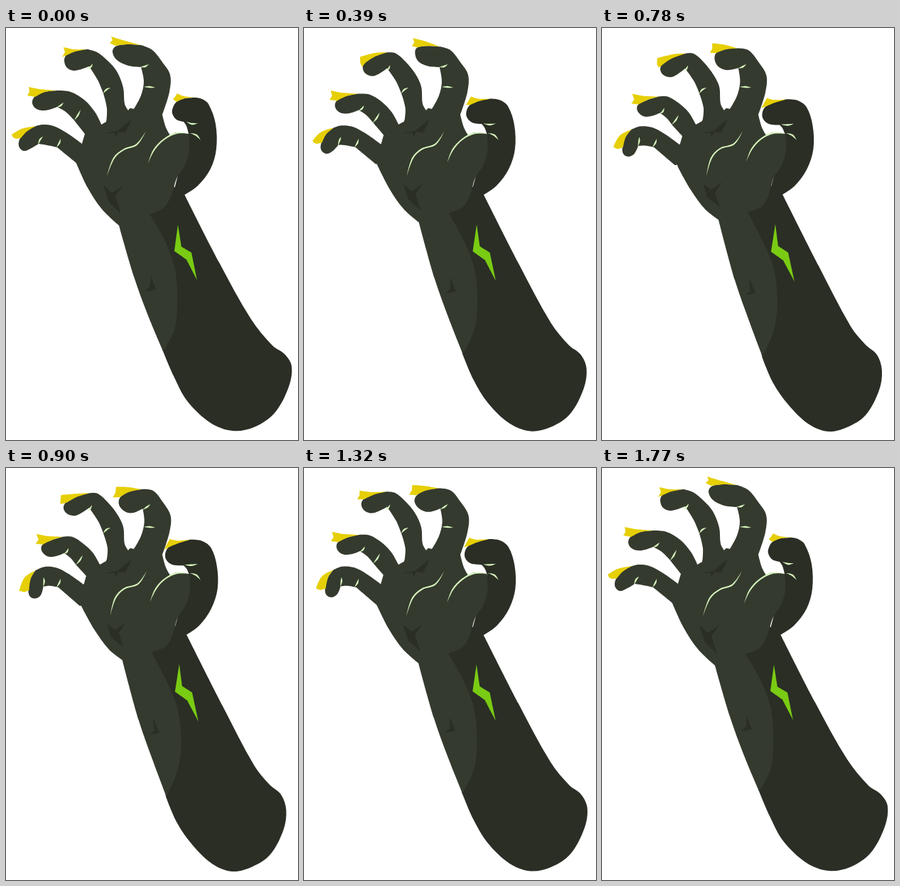
Write an HTML page with a canvas that moves like this. It is 411 by 580 pixels and loops after 1.8 s.

```html
<!DOCTYPE html>
<html lang="en">
<head>
<meta charset="utf-8">
<title>Zombie hand</title>
<style>
html, body { margin: 0; width: 100%; height: 100%; overflow: hidden; background: #fff; }
canvas { display: block; width: 411px; height: 580px; }
</style>
</head>
<body>
<canvas id="stage"></canvas>
<script>
const W = 411, H = 580, LOOP = 1800, STEP = 30;
const LIGHT = '#343a2e', DARK = '#2a2e25', NAIL = '#e6cf05', GREEN = '#7acb13', PALE = '#d8f5bd';
const TIMES = [0, 270, 540, 780, 1050, 1530, LOOP];

const canvas = document.getElementById('stage');
const ctx = canvas.getContext('2d');
const dpr = window.devicePixelRatio || 1;
canvas.width = W * dpr;
canvas.height = H * dpr;
ctx.scale(dpr, dpr);

// "x,y" is a smooth point, "x,y!" a corner
function parse(text) {
  return text.trim().split(/\s+/).map(word => {
    const [x, y] = word.replace('!', '').split(',').map(Number);
    return { x, y, corner: word.endsWith('!') };
  });
}
const poses = (...texts) => texts.map(parse);

// The first pose plus weighted offsets towards the others
function blend(list, weights) {
  return list[0].map((p, i) => {
    let { x, y } = p;
    for (let k = 1; k < list.length; k++) {
      x += weights[k - 1] * (list[k][i].x - p.x);
      y += weights[k - 1] * (list[k][i].y - p.y);
    }
    return { x, y, corner: p.corner };
  });
}

// Monotone cubic interpolation over TIMES
function sample(values, t) {
  const last = TIMES.length - 1;
  let i = 0;
  while (i < last - 1 && t >= TIMES[i + 1]) i++;
  const rise = k => (values[k + 1] - values[k]) / (TIMES[k + 1] - TIMES[k]);
  const slope = k => {
    if (k === 0 || k === last) return 0;
    const a = rise(k - 1), b = rise(k);
    return a * b <= 0 ? 0 : 2 * a * b / (a + b);
  };
  const d = TIMES[i + 1] - TIMES[i], s = (t - TIMES[i]) / d, r = 1 - s;
  return values[i] * r * r * (1 + 2 * s) + values[i + 1] * s * s * (3 - 2 * s)
    + d * s * r * (slope(i) * r - slope(i + 1) * s);
}

function fill(pts, color) {
  const n = pts.length;
  const at = i => pts[(i + n) % n];
  const handle = (i, length) => {
    const p = at(i);
    if (p.corner) return p;
    const a = at(i - 1), b = at(i + 1);
    const k = length / 3 / (Math.hypot(b.x - a.x, b.y - a.y) || 1);
    return { x: p.x + (b.x - a.x) * k, y: p.y + (b.y - a.y) * k };
  };
  ctx.beginPath();
  ctx.moveTo(pts[0].x, pts[0].y);
  for (let i = 0; i < n; i++) {
    const p = at(i), q = at(i + 1);
    const len = Math.hypot(q.x - p.x, q.y - p.y);
    const c = handle(i, len), d = handle(i + 1, -len);
    ctx.bezierCurveTo(c.x, c.y, d.x, d.y, q.x, q.y);
  }
  ctx.closePath();
  ctx.fillStyle = color;
  ctx.fill();
}

// A line that tapers to a point at both ends
function crease(pts, half) {
  const end = pts.length - 1;
  const side = sign => pts.map((p, i) => {
    if (i === 0 || i === end) return { x: p.x, y: p.y, corner: true };
    const a = pts[i - 1], b = pts[i + 1];
    const k = sign * half / Math.hypot(b.x - a.x, b.y - a.y);
    return { x: p.x - (b.y - a.y) * k, y: p.y + (b.x - a.x) * k };
  });
  fill(side(1).concat(side(-1).slice(1, -1).reverse()), PALE);
}

const armTrack = [[0, .27, .87, 1, .82, .13, 0]];

const arm = poses(
  `225,215! 251,234! 300,330 345,410 375,447 392,459 402,476 398,505 378,542 349,562
   319,567 288,556 255,525 236,490 221,455! 210,400! 200,262!`,
  `225,215! 254,234! 305,335 350,420 371,446 387,460 394,482 390,510 371,545 345,562
   318,568 290,557 262,530 241,500 226,465! 212,400! 204,259!`);

const palm = poses(
  `221,455! 237,425 241,385 238,340 224,300 202,262! 222,253 233,235 240,212 252,193
   258,172 257,149! 240,147 231,151! 225,140 220,122! 205,100! 180,114! 175,113 172,116!
   150,110! 141,132! 134,136! 120,125! 111,149! 107,163! 95,165! 98,188! 115,225 135,255
   159,278! 180,350 200,405`,
  `226,463! 242,425 247,385 242,340 230,308 205,259! 225,251 235,234 241,212 253,193
   259,172 258,149! 241,147 231,151! 225,140 220,122! 205,100! 180,114! 175,113 172,116!
   150,110! 141,131! 132,136! 124,128! 113,152! 110,163! 100,170! 107,196! 125,228 145,255
   164,270! 187,355 208,415`);

const scars = [
  poses('140,148! 157,145! 177,128! 168,147! 158,146! 154,154! 153,148!'),
  poses('137,221! 149,232! 165,222! 154,236! 162,262! 145,245!',
    '143,220! 154,228! 169,217! 159,232! 166,252! 148,238!'),
  poses('204,349! 211,368! 196,371! 203,363!', '207,352! 216,373! 202,376! 209,370!')
];

const bolt = poses('242,277! 247,308! 261,316! 269,355! 254,326! 237,314!',
  '244,276! 248,307! 262,316! 271,357! 255,327! 238,315!');

const palmLines = [
  poses('197,145 184,164 166,171 152,183 142,209', '198,145 186,163 166,170 154,183 147,208'),
  poses('258,149 240,148 222,157 208,172 200,191', '258,149 241,148 224,156 211,170 203,188')
];

const thumb = {
  color: DARK,
  tracks: [[0, .35, .65, .75, 1, .35, 0]],
  body: poses(
    `268,98! 252,99 240,104 235,112 234,120 240,129 250,132! 254,138 257,149! 235,235!
     251,235! 270,222 288,198 296,170 295,135 285,107 276,100`,
    `258,101! 241,106 228,112 223,120 224,130 233,137 250,138! 254,142 258,150! 235,235!
     254,235! 272,222 289,198 298,170 297,138 289,113 276,103`),
  nail: poses('241,92! 250,96 268,98! 252,99 240,104! 235,100! 238,97!',
    '229,101! 240,103 258,101! 241,107 229,112! 221,117! 224,110!'),
  lines: [
    poses('270,134 262,135 254,132', '270,135 261,137 251,137'),
    poses('259,148 268,151 274,158')
  ]
};

const fingers = [
  { // little
    tracks: [[0, .22, .42, .62, 1, .33, 0]],
    body: poses(
      `42,138! 29,145 20,155 18,166 25,173 36,169 46,163! 58,165 72,168! 99,190! 125,190!
       107,163! 86,148 67,138 52,136`,
      `41,146! 36,158 34,177 38,185 46,186 52,181 54,168! 62,166 74,168! 105,195! 125,190!
       108,163! 88,149 72,141 54,140`),
    nail: poses('8,150! 22,142 42,138! 29,146 21,155! 14,156! 10,154!',
      '21,178! 27,157 41,146! 36,158 35,176! 28,179! 23,178!'),
    lines: [
      poses('52,153 48,157 45,165', '53,154 55,160 54,168'),
      poses('77,156 75,162 71,168')
    ]
  },
  { // ring
    tracks: [[0, .3, .75, .95, 1, .3, 0]],
    body: poses(
      `74,88! 54,90 40,97 37,106 43,114 56,116 72,111! 84,118 96,130! 111,149! 130,155!
       134,135! 125,118 110,101 91,90`,
      `80,97! 64,102 51,109 51,118 60,125 72,124 82,120! 91,127 99,137! 113,152! 130,155!
       132,136! 122,119 108,106 93,97`),
    nail: poses('32,83! 47,86 74,88! 55,90 41,97! 30,95! 33,90!',
      '43,93! 58,96 80,97! 64,102 52,108! 42,107! 46,101!'),
    lines: [
      poses('81,105 77,109 71,112', '88,113 86,118 81,122'),
      poses('105,115 101,123 96,130', '108,123 104,130 98,137')
    ]
  },
  { // middle
    tracks: [[0, .4, 1, .7, 0, 0, 0], [0, 0, 0, .3, 1, .3, 0]],
    body: poses(
      `115,30! 98,32 85,38 82,46 86,56 97,60 117,54! 129,73 137,92! 142,113 141,134!
       165,140! 172,116! 167,107 165,84 156,61 143,46 128,34`,
      `118,36! 99,43 86,52 83,61 89,69 101,70 117,58! 130,76 137,92! 143,113 141,134!
       165,140! 172,116! 167,107 165,82 157,66 143,48 129,36`,
      `118,35! 98,39 83,47 80,55 86,63 98,65 117,55! 130,75 137,92! 143,113 141,134!
       165,140! 172,116! 167,107 165,83 156,64 143,48 129,36`),
    nail: poses('81,27! 95,30 115,30! 98,33 86,38! 79,41! 83,34!',
      '78,46! 103,37 118,36! 99,44 88,52! 83,60! 78,56!',
      '77,34! 97,36 118,35! 98,40 84,47! 73,46! 76,40!'),
    lines: [
      poses('122,50 119,55 113,58', '121,53 119,58 116,61', '121,52 118,57 114,60'),
      poses('147,84 141,87 137,92')
    ]
  },
  { // index
    tracks: [[0, .45, 1, .6, 0, 0, 0], [0, 0, 0, .4, 1, .25, 0]],
    body: poses(
      `190,24! 170,23 154,26 150,34 156,45 172,53 190,55! 194,75 190,95 180,114! 200,130!
       220,122! 230,90 231,66 220,48 206,31`,
      `192,27! 174,26 160,29 159,40 164,49 176,54 191,55! 194,75 190,95 180,114! 200,130!
       220,122! 230,90 231,66 220,48 206,31`,
      `190,31! 173,36 161,46 159,56 167,65 178,67 193,58! 195,76 190,96 180,114! 200,130!
       220,122! 230,91 232,68 221,48 207,32`),
    nail: poses('148,12! 164,17 190,24! 170,23 154,25! 146,21! 150,17!',
      '155,15! 172,19 192,27! 174,26 161,28! 154,27! 157,21!',
      '155,31! 172,30 190,31! 172,37 160,46! 149,47! 153,40!'),
    lines: [
      poses('201,51 196,54 189,55', '203,51 198,54 191,55', '203,51 199,55 193,60'),
      poses('210,84 202,83 194,83')
    ]
  }
];

const weigh = (tracks, t) => tracks.map(v => sample(v, t));

function drawFinger(finger, t) {
  const w = weigh(finger.tracks, t);
  fill(blend(finger.body, w), finger.color || LIGHT);
  fill(blend(finger.nail, w), NAIL);
}

function drawLines(finger, t) {
  const w = weigh(finger.tracks, t);
  finger.lines.forEach(line => crease(blend(line, w), 1.2));
}

function draw(t) {
  const w = weigh(armTrack, t);
  ctx.fillStyle = '#fff';
  ctx.fillRect(0, 0, W, H);
  fill(blend(arm, w), DARK);
  drawFinger(thumb, t);
  fill(blend(palm, w), LIGHT);
  fingers.forEach(f => drawFinger(f, t));
  scars.forEach(s => fill(blend(s, w), DARK));
  fill(blend(bolt, w), GREEN);
  palmLines.forEach(line => crease(blend(line, w), 1));
  [thumb, ...fingers].forEach(f => drawLines(f, t));
}

const start = performance.now();
function tick() {
  const t = (performance.now() - start) % LOOP;
  draw(Math.floor(t / STEP) * STEP);
  requestAnimationFrame(tick);
}
tick();
</script>
</body>
</html>
```
